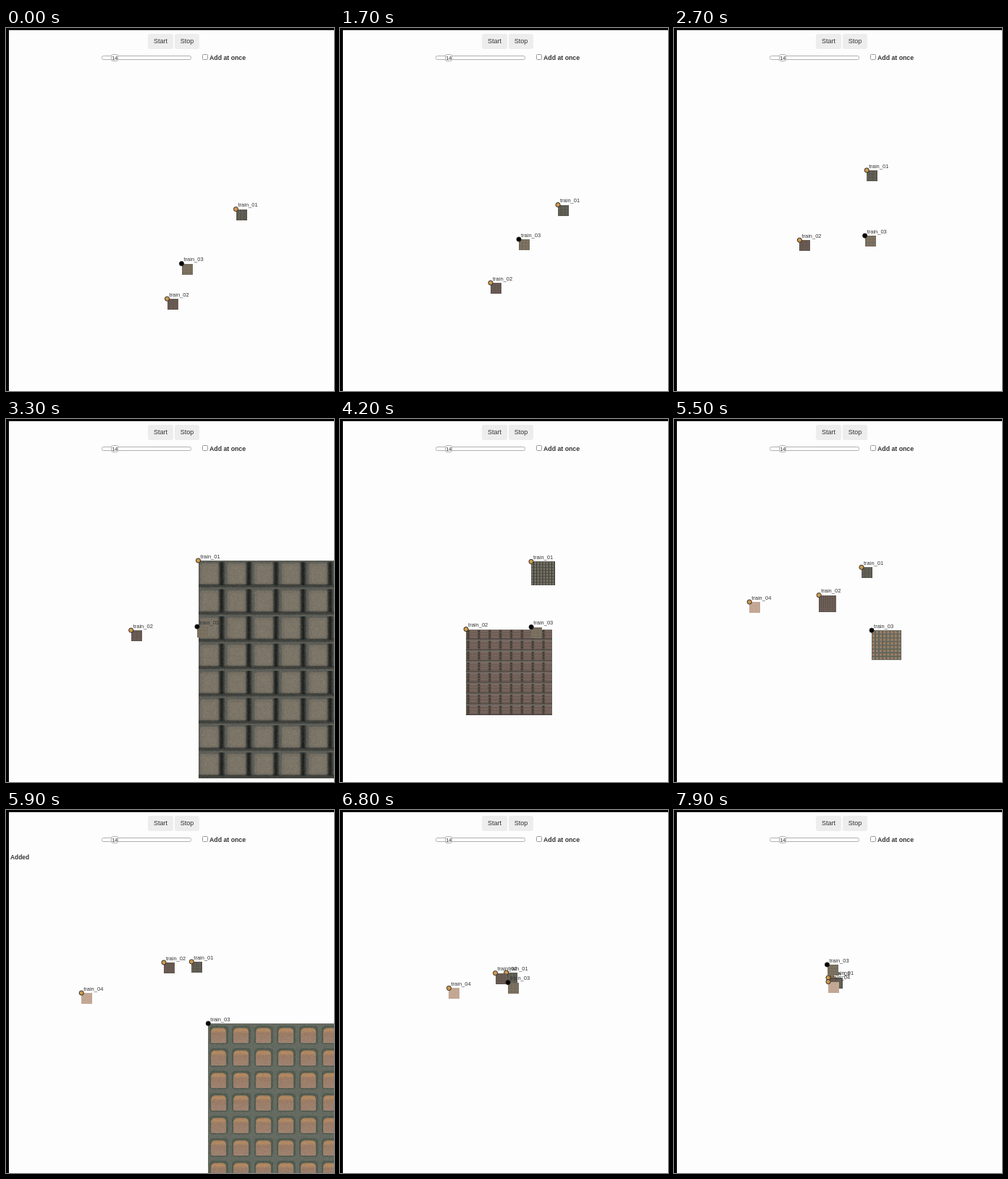
An HTML page with a canvas that plays this animation: 453x500 px, repeating every 8 s.

```html
<!DOCTYPE html>
<html lang="en">
<head>
<meta charset="utf-8">
<title>Force layout</title>
<style>
html, body { margin: 0; width: 100%; height: 100%; overflow: hidden; background: #fdfdfd; }
canvas { display: block; width: 453px; height: 500px; }
</style>
</head>
<body>
<canvas id="stage"></canvas>
<script>
const W = 453, H = 500, LOOP = 8000, STEP = 100, THUMB = 15;
const FONT = '"Liberation Sans", Arial, sans-serif';
const canvas = document.getElementById('stage');
const ratio = window.devicePixelRatio || 1;
canvas.width = W * ratio;
canvas.height = H * ratio;
const ctx = canvas.getContext('2d');
ctx.scale(ratio, ratio);
ctx.imageSmoothingQuality = 'high';

function rect(c, color, x, y, w, h) {
  c.fillStyle = color;
  c.fillRect(x, y, w, h);
}

function roundBox(c, x, y, w, h, r, fill, stroke) {
  c.beginPath();
  c.roundRect(x, y, w, h, r);
  c.fillStyle = fill;
  c.fill();
  if (stroke) {
    c.strokeStyle = stroke;
    c.lineWidth = 1;
    c.stroke();
  }
}

// Sprite sheets: 8 x 8 copies of one small woven tile
const TILE = 40, GRID = 8;

function makeSheet(paintTile, seed) {
  const sheet = document.createElement('canvas');
  sheet.width = sheet.height = TILE * GRID;
  const c = sheet.getContext('2d');
  const random = () => (seed = (seed * 16807) % 2147483647) / 2147483647;
  for (let i = 0; i < GRID * GRID; i++) {
    c.save();
    c.translate((i % GRID) * TILE, Math.floor(i / GRID) * TILE);
    paintTile(c);
    c.restore();
  }
  for (let y = 0; y < sheet.height; y++) {
    for (let x = 0; x < sheet.width; x++) {
      const light = (x + y) % 2 ? 255 : 0;
      rect(c, `rgba(${light},${light},${light},${random() * 0.13})`, x, y, 1, 1);
    }
  }
  return sheet;
}

// Strip that fades out at both long sides
function band(c, color, x, y, w, h) {
  const g = h > w ? c.createLinearGradient(x, 0, x + w, 0) : c.createLinearGradient(0, y, 0, y + h);
  g.addColorStop(0, 'transparent');
  g.addColorStop(0.5, color);
  g.addColorStop(1, 'transparent');
  rect(c, g, x, y, w, h);
}

function grayTile(c) {
  rect(c, '#5b5c55', 0, 0, TILE, TILE);
  roundBox(c, 3, 4, 28, 31, 4, '#766f62');
  roundBox(c, 7, 8, 20, 24, 3, '#7c7567');
  band(c, '#151a16', 29, 2, 11, 35);
  band(c, '#3f423c', 0, 34, TILE, 6);
}

function redTile(c) {
  rect(c, '#7a655c', 0, 0, TILE, TILE);
  band(c, '#363a2c', 2, 3, 12, 34);
  for (let y = 10; y < TILE; y += 10) band(c, '#83736a', 0, y, TILE, 5);
  rect(c, '#74736e', 0, 0, TILE, 3);
  band(c, '#5f5a54', 0, 34, TILE, 6);
}

function tanTile(c) {
  rect(c, '#646a60', 0, 0, TILE, TILE);
  roundBox(c, 2, 4, 34, 33, 6, '#505a4e');
  const g = c.createLinearGradient(0, 8, 0, 35);
  g.addColorStop(0, '#a57d58');
  g.addColorStop(0.15, '#b98d62');
  g.addColorStop(0.35, '#9c7b64');
  g.addColorStop(1, '#a08370');
  roundBox(c, 5, 8, 27, 27, [7, 7, 2, 2], g);
}

function pinkTile(c) {
  rect(c, '#bda18e', 0, 0, TILE, TILE);
  roundBox(c, 4, 4, 31, 32, 6, '#d2b39f');
}

const clamp = u => Math.min(1, Math.max(0, u));
const easeIn = u => u ** 3;
const easeOut = u => 1 - (1 - u) ** 4;
const settle = u => 1 - (1 - u) ** 2;
const smooth = u => u * u * (3 - 2 * u);

// Every node rests at one stop per moment; a leg between two moments shares one easing
const moments = [0, 1700, 3300, 5000, 5900, 7900];
const easings = [easeIn, easeOut, smooth, smooth, settle];
const OPEN_TIME = 600;

// zoom: when the picture starts to open, when it starts to close, its full size
const nodes = [
  {
    label: 'train_01', sheet: makeSheet(grayTile, 11), zoom: [2700, 3750, 300],
    stops: [[317.5, 249.5], [301, 243.5], [265.5, 195], [262.7, 197.6], [256.3, 209], [218, 230.5]]
  },
  {
    label: 'train_02', sheet: makeSheet(redTile, 22), zoom: [3850, 5000, 320],
    stops: [[222.5, 373], [208, 351], [172.7, 291], [175.3, 288.3], [218, 210], [213, 231]]
  },
  {
    label: 'train_03', sheet: makeSheet(tanTile, 33), zoom: [5300, 5900, 248], dot: '#050505',
    stops: [[242.5, 324.5], [247, 291], [264, 286], [264.3, 287], [279.3, 294], [211.5, 213]]
  },
  {
    label: 'train_04', sheet: makeSheet(pinkTile, 44), born: 5500,
    stops: [[104.2, 252], [213, 236.5]]
  }
];

function position(node, t) {
  const first = moments.length - node.stops.length;
  let leg = first;
  while (leg < moments.length - 2 && t >= moments[leg + 1]) leg++;
  const u = clamp((t - moments[leg]) / (moments[leg + 1] - moments[leg]));
  const eased = (node.born ? smooth : easings[leg])(u);
  const [a, b] = node.stops.slice(leg - first);
  const sway = leg === 0 ? Math.sin(Math.PI * Math.sqrt(u)) : 0;
  return [a[0] + (b[0] - a[0]) * eased + 9 * sway, a[1] + (b[1] - a[1]) * eased + 13 * sway];
}

function pictureSize({ zoom }, t) {
  if (!zoom) return THUMB;
  const [open, close, full] = zoom;
  const grown = t < close ? clamp((t - open) / OPEN_TIME) : 1 - clamp((t - close) / OPEN_TIME);
  return THUMB + (full - THUMB) * grown ** 2;
}

function text(string, x, y, size, { weight = 'normal', align = 'left' } = {}) {
  ctx.font = `${weight} ${size}px ${FONT}`;
  ctx.textAlign = align;
  ctx.fillStyle = '#333';
  ctx.fillText(string, x, y);
}

function drawControls(t) {
  roundBox(ctx, 196, 8, 35, 21, 3, '#ededed');
  roundBox(ctx, 233, 8, 34, 21, 3, '#ededed');
  text('Start', 213.5, 21.3, 9, { align: 'center' });
  text('Stop', 250, 21.3, 9, { align: 'center' });
  roundBox(ctx, 132.5, 38.5, 123, 5, 2, '#fff', '#b0b0b0');
  roundBox(ctx, 145.5, 36.5, 9, 9, 2, '#f6f6f6', '#b5b5b5');
  text('14', 150.2, 43.8, 7, { align: 'center' });
  roundBox(ctx, 271.5, 36.5, 7, 7, 1, '#fff', '#999');
  text('Add at once', 281, 44, 8.75, { weight: 'bold' });
  if (t >= 5600 && t < 6400) text('Added', 6, 68, 8.4, { weight: 'bold' });
}

function drawNode(node, t) {
  if (t < (node.born || 0)) return;
  const [x, y] = position(node, t);
  const size = pictureSize(node, t);
  ctx.drawImage(node.sheet, x, y, size, size);
  ctx.beginPath();
  ctx.arc(x, y, 3.1, 0, Math.PI * 2);
  ctx.fillStyle = node.dot || '#cc9a4e';
  ctx.fill();
  ctx.strokeStyle = '#222';
  ctx.lineWidth = 0.9;
  ctx.stroke();
  text(node.label, x + 3, y - 3.2, 7.5);
}

function render(t) {
  rect(ctx, '#fdfdfd', 0, 0, W, H);
  rect(ctx, '#000', 0, 0, W, 3);
  rect(ctx, '#000', 0, 0, 4, H);
  drawControls(t);
  nodes.forEach(node => drawNode(node, t));
}

const start = performance.now();
function tick() {
  const elapsed = (performance.now() - start) % LOOP;
  const t = Math.floor(elapsed / STEP) * STEP;
  render(t < 200 ? 0 : t);
  requestAnimationFrame(tick);
}
tick();
</script>
</body>
</html>
```
